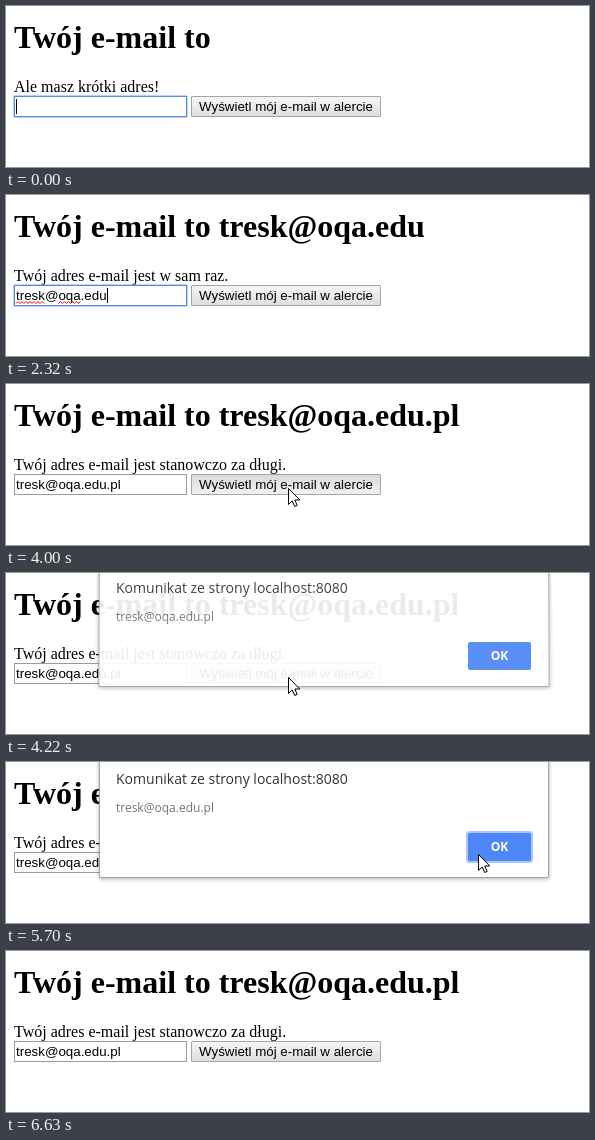
An HTML page that plays this animation: 583 px wide and 161 px high, repeating every 6960 ms.

```html
<!DOCTYPE html>
<html lang="pl">
<head>
<meta charset="utf-8">
<title>Twój e-mail</title>
<style>
  html, body { margin: 0; width: 100%; height: 100%; overflow: hidden; background: #fff; }
  svg { display: block; width: 100%; height: 100%; }
  .serif { font: 16px "Liberation Serif", "Times New Roman", serif; }
  .title { font-size: 32px; font-weight: bold; }
  .field { font: 13.333px "Liberation Sans", Arial, sans-serif; }
  .ui { font: 14px "Open Sans", "Noto Sans", sans-serif; }
  .small { font-size: 12px; }
  .strong { font-weight: 700; }
  #panel { filter: drop-shadow(0 1px 2px rgba(0, 0, 0, .3)); }
</style>
</head>
<body>
<svg viewBox="0 0 583 161">
  <defs>
    <linearGradient id="raised" x2="0" y2="1">
      <stop offset=".1" stop-color="#f4f4f4"/>
      <stop offset="1" stop-color="#dedede"/>
    </linearGradient>
    <linearGradient id="pressed" x2="0" y2="1">
      <stop offset="0" stop-color="#dadada"/>
      <stop offset=".9" stop-color="#efefef"/>
    </linearGradient>
  </defs>

  <text id="title" class="serif title" x="8" y="42"></text>
  <text id="note" class="serif" x="8" y="86"></text>

  <rect id="ring" x="7.5" y="89.5" width="174" height="22" rx="1.5" fill="none" stroke="#4d90fe" stroke-opacity=".4"/>
  <rect id="box" x="8.5" y="90.5" width="172" height="20" fill="#fff"/>
  <path id="wave" fill="none" stroke="#f00"/>
  <text id="value" class="field" x="10" y="105"></text>
  <rect id="caret" y="93" width="1" height="15"/>

  <rect id="button" x="185.5" y="90.5" width="189" height="20" rx=".5" stroke="#a6a6a6"/>
  <text class="field" x="280" y="105" text-anchor="middle">Wyświetl mój e-mail w alercie</text>

  <g id="dialog">
    <path id="panel" fill="#fff" stroke="#a3a3a3"/>
    <text class="ui" x="110" y="22" fill="#333">Komunikat ze strony localhost:8080</text>
    <text id="alert" class="ui small" x="110" y="50" fill="#757575"></text>
    <rect id="halo" x="460" y="69" width="67" height="32" rx="3" fill="#a9c7fb"/>
    <rect x="462" y="71" width="63" height="28" rx="2" fill="#4d86f7"/>
    <text class="ui small strong" x="493.5" y="89" text-anchor="middle" fill="#fff">OK</text>
  </g>

  <path id="mouse" d="M.5.5V16.5L4.2 13L6.7 18.5L9.2 17.4L6.8 12H11.8Z" fill="#fff" stroke="#000"/>
</svg>
<script>
// The screen refreshes in even steps; all moments below count these steps.
const LOOP = 6960, STEP = 105.5, LEAD = 17;
const BLINK = 5, CLICK = 38, CLOSE = 55, ENTER = 32, LEAVE = 63;
const EMAIL = "tresk@oqa.edu.pl";

// Typing bursts: first step, last step, characters
const bursts = [[2, 6, 5], [12, 12, 1], [16, 16, 1], [18, 25, 9]];

// Pointer glides: first step, last step, target
const home = { x: 305, y: 165 };
const glides = [
  { from: 31, to: 36, x: 282, y: 104 },
  { from: 48, to: 55, x: 474, y: 92 },
  { from: 59, to: 62, x: 489, y: 131 },
];

const $ = id => document.getElementById(id);
const set = (id, name, value) => $(id).setAttribute(name, value);
const show = (id, on) => set(id, "visibility", on ? "visible" : "hidden");
const clamp = v => Math.min(1, Math.max(0, v));
const easeOut = v => 1 - (1 - clamp(v)) ** 2.3;

function typing(step) {
  let count = 0, last = 1 - BLINK;
  for (const [from, to, chars] of bursts) {
    if (step < from) break;
    count += 1 + Math.round((chars - 1) * clamp((step - from) / (to - from || 1)));
    last = to;
  }
  return { count, idle: Math.max(0, step - last) };
}

function pointer(step) {
  let { x, y } = home;
  for (const g of glides) {
    const p = easeOut((step - g.from) / (g.to - g.from));
    x += (g.x - x) * p;
    y += (g.y - y) * p;
  }
  return `translate(${Math.round(x)} ${Math.round(y)})`;
}

function message(length) {
  if (length < 10) return "Ale masz krótki adres!";
  return "Twój adres e-mail jest " + (length > 15 ? "stanowczo za długi." : "w sam raz.");
}

function zigzag(x0, x1) {
  let d = `M${x0} 108.5`;
  for (let x = x0 + 2, up = true; x <= x1; x += 2, up = !up) d += `L${x} ${up ? 106.5 : 108.5}`;
  return d;
}

// Underlines every word that is already followed by a separator.
function underline(text) {
  const value = $("value");
  return [...text.matchAll(/\w+(?=[@.])/g)].map(({ 0: word, index }) => zigzag(
    value.getStartPositionOfChar(index).x,
    value.getEndPositionOfChar(index + word.length - 1).x
  )).join("");
}

function drawForm(step) {
  const { count, idle } = typing(step);
  const text = EMAIL.slice(0, count);
  const focused = step < CLICK;
  $("title").textContent = "Twój e-mail to " + text;
  $("note").textContent = message(count);
  $("value").textContent = text;

  show("ring", focused);
  set("box", "stroke", focused ? "#5c8ad6" : "#9a9a9a");
  set("wave", "d", focused ? underline(text) : "");
  show("caret", focused && idle % (2 * BLINK) < BLINK);
  set("caret", "x", 10 + Math.round(count && $("value").getComputedTextLength()));
  set("button", "fill", step === CLICK ? "url(#pressed)" : "url(#raised)");
}

function drawDialog(step) {
  const alpha = step > CLOSE ? clamp(1 - (step - CLOSE) / 2) : easeOut((step - CLICK) / 3);
  const away = 1 - alpha, flare = 8 * away;
  show("dialog", alpha > 0);
  show("halo", alpha === 1);
  set("dialog", "opacity", alpha);
  set("dialog", "transform", `translate(0 ${-25 * away})`);
  set("panel", "d", `M93.5-60.5H542.5L${542.5 + flare} 115.5H${93.5 - flare}Z`);
}

function draw(time) {
  const step = Math.floor((time + LEAD) / STEP);
  drawForm(step);
  drawDialog(step);
  show("mouse", step >= ENTER && step < LEAVE);
  set("mouse", "transform", pointer(step));
}

$("alert").textContent = EMAIL;
const start = performance.now();
function tick() {
  draw((performance.now() - start) % LOOP);
  requestAnimationFrame(tick);
}
tick();
</script>
</body>
</html>
```
